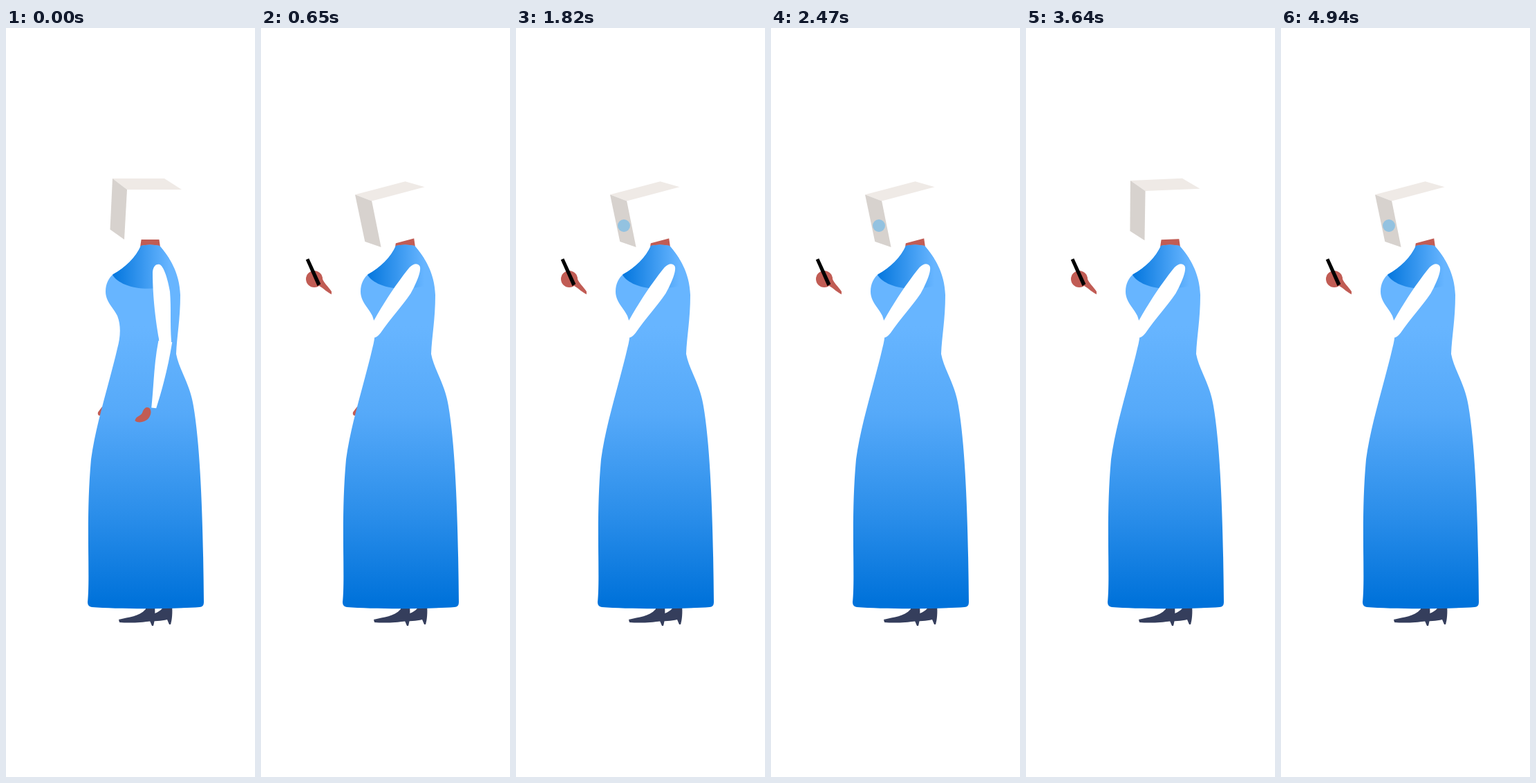
Animation, 360 px wide and 1080 px high, one loop 5200 ms. Source, as an HTML page:

```html
<!DOCTYPE html>
<html lang="en">
<head>
<meta charset="utf-8">
<title>Boxed head</title>
<style>
html, body { margin: 0; width: 100%; height: 100%; overflow: hidden; background: #fff; }
svg { display: block; width: 100%; height: 100%; }
</style>
</head>
<body>
<svg viewBox="0 0 360 1080">
  <defs>
    <linearGradient id="cloth" gradientUnits="userSpaceOnUse" x1="0" y1="430" x2="0" y2="828">
      <stop offset="0" stop-color="#67b5ff"/>
      <stop offset=".32" stop-color="#55a9f9"/>
      <stop offset=".68" stop-color="#2b8eea"/>
      <stop offset="1" stop-color="#0072da"/>
    </linearGradient>
    <linearGradient id="shade" gradientUnits="userSpaceOnUse" x1="155" y1="0" x2="236" y2="0">
      <stop offset="0" stop-color="#0577de"/>
      <stop offset="1" stop-color="#67b5ff"/>
    </linearGradient>
    <clipPath id="body"><use href="#dress"/></clipPath>
  </defs>

  <g fill="#353e5c">
    <path id="shoe" d="M163 853C178 849 192 849 202 838V834H215C216 845 215 856 213 862H211L208 855C195 858 175 858 164 857Z"/>
    <use href="#shoe" x="25" y="-2"/>
  </g>
  <path id="backHand" d="M139 546L133 554Q132 558 135 559L141 557Z" fill="#c15c54"/>
  <path d="M197 295H220L223 316H194Z" fill="#c15c54"/>
  <path id="dress" fill="url(#cloth)" d="M195 314Q208 311 222 314C236 330 251 352 252 385C252 420 247 445 246 470C250 492 266 513 271 545C282 610 285 720 286 828Q286 835 280 835C240 838 160 838 124 835Q118 834 118 828C122 790 115 710 123 622C130 570 150 510 161 462C165 448 167 430 161 415C156 404 144 395 144 380C144 368 149 360 155 355C172 346 188 330 195 314Z"/>
  <path clip-path="url(#body)" fill="url(#shade)" d="M154 356C163 371 195 382 236 372V300H190L150 345Z"/>

  <!-- Box, with its centre as the origin -->
  <g id="head">
    <path d="M-14 -16H65L61 56H-18Z" fill="#fff"/>
    <path d="M-35 -32H40L65 -16H-14Z" fill="#efeae6"/>
    <path d="M-35 -32L-14 -16L-18 56L-38.5 41.5Z" fill="#d7d2ce"/>
  </g>
  <circle id="badge" cx="156" cy="285" r="9" fill="#93c2e0"/>

  <g id="arm" fill="#fff">
    <path d="M212 352C213 342 218 340 222 341C228 343 234 362 237 380C239 405 237 425 239 452C239 460 237 464 232 464H222L221 448C217 425 212 390 212 352Z"/>
    <g id="fore">
      <path d="M-10 -3C-13 30 -10 60 -10 94H-3C2 70 8 35 10 -3Z"/>
      <path id="hand" fill="#c15c54" d="M-22 121C-24 114 -18 112 -18 106C-19 98 -17 95 -12 95C-6 97 -4 107 -8 113C-12 119 -17 122 -22 121Z"/>
    </g>
  </g>
  <g id="grip" fill="#c15c54">
    <circle cx="77" cy="362" r="12"/>
    <path d="M64.8 334.3L69.3 332.3L86.5 369.5L81.5 372Z" fill="#000"/>
    <path d="M83 357Q86 353 88 358C89 367 98 373 102 380V384C97 382 91 376 83 371L87 369Z"/>
  </g>
</svg>
<script>
const LOOP = 5200, STEP = 130;
const el = id => document.getElementById(id);
const move = (id, value) => el(id).setAttribute('transform', value);
const show = (id, on) => el(id).setAttribute('visibility', on ? 'visible' : 'hidden');
const ramp = (t, from, to) => Math.min(1, Math.max(0, (t - from) / (to - from)));

function drawHead(t) {
  const nod = ramp(t, 0, 620);
  const lift = ramp(t, 2470, 2730) - ramp(t, 3510, 3770);
  const tilt = 24.9 * lift - 14.8 * nod;
  // The box swings on the neck and shortens as it leans forward
  const x = 189 + 0.775 * tilt;
  const y = 249 - 0.433 * tilt + 0.0233 * tilt * tilt;
  const tall = Math.min(1, 1 + 0.004 * tilt);
  move('head', `translate(${x} ${y}) rotate(${tilt}) scale(1 ${tall})`);
  show('badge', t >= 780 && lift === 0);
}

function drawArm(t) {
  const bend = ramp(t, 0, 390), raise = ramp(t, 390, 650);
  move('arm', `rotate(${39 * raise} 222.7 352.4)`);
  move('fore', `translate(230 455) rotate(${6 + 84 * bend})`);
  move('hand', `rotate(${22 * (1 - bend)} -12 93)`);
  show('hand', raise < 1);
  show('grip', raise === 1);
  show('backHand', t < 780);
}

function draw(ms) {
  const t = Math.floor(ms % LOOP / STEP) * STEP;
  drawHead(t);
  drawArm(t);
}

const start = performance.now();
function tick() {
  draw(performance.now() - start);
  requestAnimationFrame(tick);
}
tick();
</script>
</body>
</html>
```
